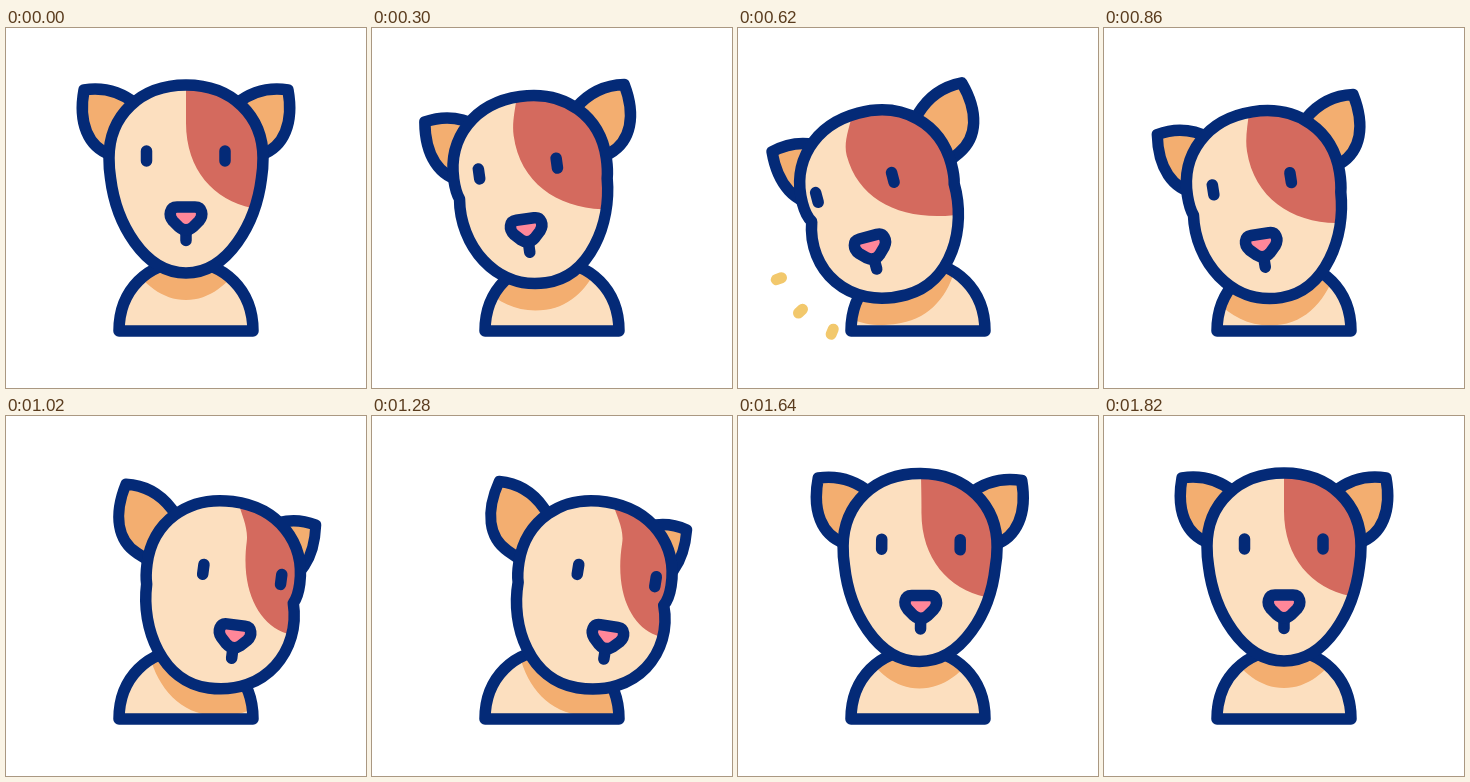
Animation of 360 by 360 pixels, one loop 2.4 s. Source, as an HTML page:

```html
<!DOCTYPE html>
<html lang="en">
<head>
<meta charset="utf-8">
<title>Dog looking around</title>
<style>
  html, body { margin: 0; width: 100%; height: 100%; overflow: hidden; background: #fff; }
  svg { display: block; width: 100%; height: 100%; }
  .line { fill: none; stroke: #042a77; stroke-width: 11.5; stroke-linecap: round; stroke-linejoin: round; }
  .cream { fill: #fcdfbf; }
  .orange { fill: #f3ae70; }
</style>
</head>
<body>
<svg viewBox="0 0 360 360">
  <defs>
    <path id="skull"/>
    <path id="torso" d="M113 303C113 262 142 234 180 234C218 234 247 262 247 303Z"/>
    <path id="ear" d="M-35-62L-50-74C-65-86-83-91-102-88C-108-55-98-31-75-23L-55-16Z"/>
    <clipPath id="inSkull"><use href="#skull"/></clipPath>
    <clipPath id="inTorso"><use href="#torso"/></clipPath>
  </defs>

  <use href="#torso" class="cream"/>
  <g clip-path="url(#inTorso)"><use id="shade" href="#skull" class="orange"/></g>
  <use href="#torso" class="line"/>

  <path id="marks" fill="none" stroke="#f2c86c" stroke-width="11" stroke-linecap="round"/>

  <g id="ears">
    <g id="leftEar">
      <use href="#ear" class="orange"/>
      <use href="#ear" class="line"/>
    </g>
    <use href="#leftEar" transform="scale(-1 1)"/>
  </g>

  <g id="head">
    <use href="#skull" class="cream"/>
    <path id="patch" fill="#d46a5e" clip-path="url(#inSkull)"/>
    <use href="#skull" class="line"/>
    <g id="face">
      <path class="line" d="M-39.5-27V-17M39-27V-17M0 54V62.5"/>
      <path class="line" style="fill:#ff8799" d="M-9 29H9C16 29 18 37 13 43L7 49Q0 55-7 49L-13 43C-18 37-16 29-9 29Z"/>
    </g>
  </g>
</svg>
<script>
const LOOP = 2400;
const $ = id => document.getElementById(id);
const clamp = v => Math.min(1, Math.max(0, v));
const lerp = (a, b, u) => a + (b - a) * u;
const easeInOut = p => p < 0.5 ? 8 * p ** 4 : 1 - 8 * (1 - p) ** 4;

const REST = { x: 0, y: 0, angle: 0, turn: 0, earX: 0, earY: 0, earAngle: 0, earWidth: 1 };
const LEFT = { x: -36, y: 25, angle: -14.8, turn: -22, earX: -21, earY: 22, earAngle: -20, earWidth: 0.99 };
const RIGHT = { x: 40, y: 28, angle: 9, turn: 22, earX: 19, earY: 25, earAngle: 14.5, earWidth: 0.95 };
const MOVES = [
  { start: 0, end: 592, from: REST, to: LEFT },
  { start: 620, end: 1196, from: LEFT, to: RIGHT },
  { start: 1200, end: 1812, from: RIGHT, to: REST }
];
const BARKS = [
  { start: 490, end: 650, x: 131, y: 217, side: -1 },
  { start: 1110, end: 1270, x: 242, y: 225, side: 1 }
];

function poseAt(t) {
  const { start, end, from, to } = MOVES.find(m => t < m.end) || MOVES[2];
  const u = easeInOut(clamp((t - start) / (end - start)));
  const pose = {};
  for (const key in REST) pose[key] = lerp(from[key], to[key], u);
  // The head dips a little later than it turns, and rises a little earlier.
  if (from === REST) pose.y = to.y * u ** 1.35;
  if (to === REST) pose.y = from.y * (1 - u) ** 1.35;
  return pose;
}

const place = (x, y, angle) => `translate(${180 + x} ${150 + y}) rotate(${angle})`;

// The muzzle swells towards the side the head turns to, leaving a notch at the cheek.
function skullPath(turn) {
  const swell = side => Math.abs(turn) * (side * turn > 0 ? 0.85 : 0.25);
  const r = swell(1), l = swell(-1);
  return `M0-93C46-93 77-62 77-20C77-12 76.5-6 ${75.5 - 0.15 * r} 0` +
    `C${70 + r} 45 ${42 + r} 95 0 95` +
    `C${-42 - l} 95 ${-70 - l} 45 ${-75.5 + 0.15 * l} 0` +
    `C-76.5-6-77-12-77-20C-77-62-46-93 0-93Z`;
}

function patchPath(s) {
  return `M${0.2 * s}-96C${0.6 * s}-80 ${s}-68 ${s}-55` +
    `C${s}-8 ${28 + 0.6 * s} 22 66 30L110 40V-110H${0.2 * s}Z`;
}

// Short dashes shoot outwards from the nose and shrink away at their far ends.
function marksPath(t) {
  const bark = BARKS.find(b => t >= b.start && t < b.end);
  if (!bark) return "";
  const p = (t - bark.start) / (bark.end - bark.start);
  const outer = lerp(76, 99, clamp(p / 0.6));
  const inner = lerp(76, 99, clamp((p - 0.25) / 0.75));
  return [20.5, 44, 67].map((deg, i) => {
    const a = deg * Math.PI / 180;
    const at = r => `${bark.x + bark.side * (r - i) * Math.cos(a)} ${bark.y + (r - i) * Math.sin(a)}`;
    return `M${at(inner)}L${at(outer)}`;
  }).join("");
}

function draw(t) {
  const p = poseAt(t);
  $("skull").setAttribute("d", skullPath(p.turn));
  $("head").setAttribute("transform", place(p.x, p.y, p.angle));
  $("shade").setAttribute("transform", place(p.x, p.y + 27, p.angle));
  $("ears").setAttribute("transform", `${place(p.earX, p.earY, p.earAngle)} scale(${p.earWidth} 1)`);
  $("face").setAttribute("transform", `translate(${p.turn} 0)`);
  $("patch").setAttribute("d", patchPath(p.turn));
  $("marks").setAttribute("d", marksPath(t));
}

const began = performance.now();
function tick() {
  draw((performance.now() - began) % LOOP);
  requestAnimationFrame(tick);
}
tick();
</script>
</body>
</html>
```
